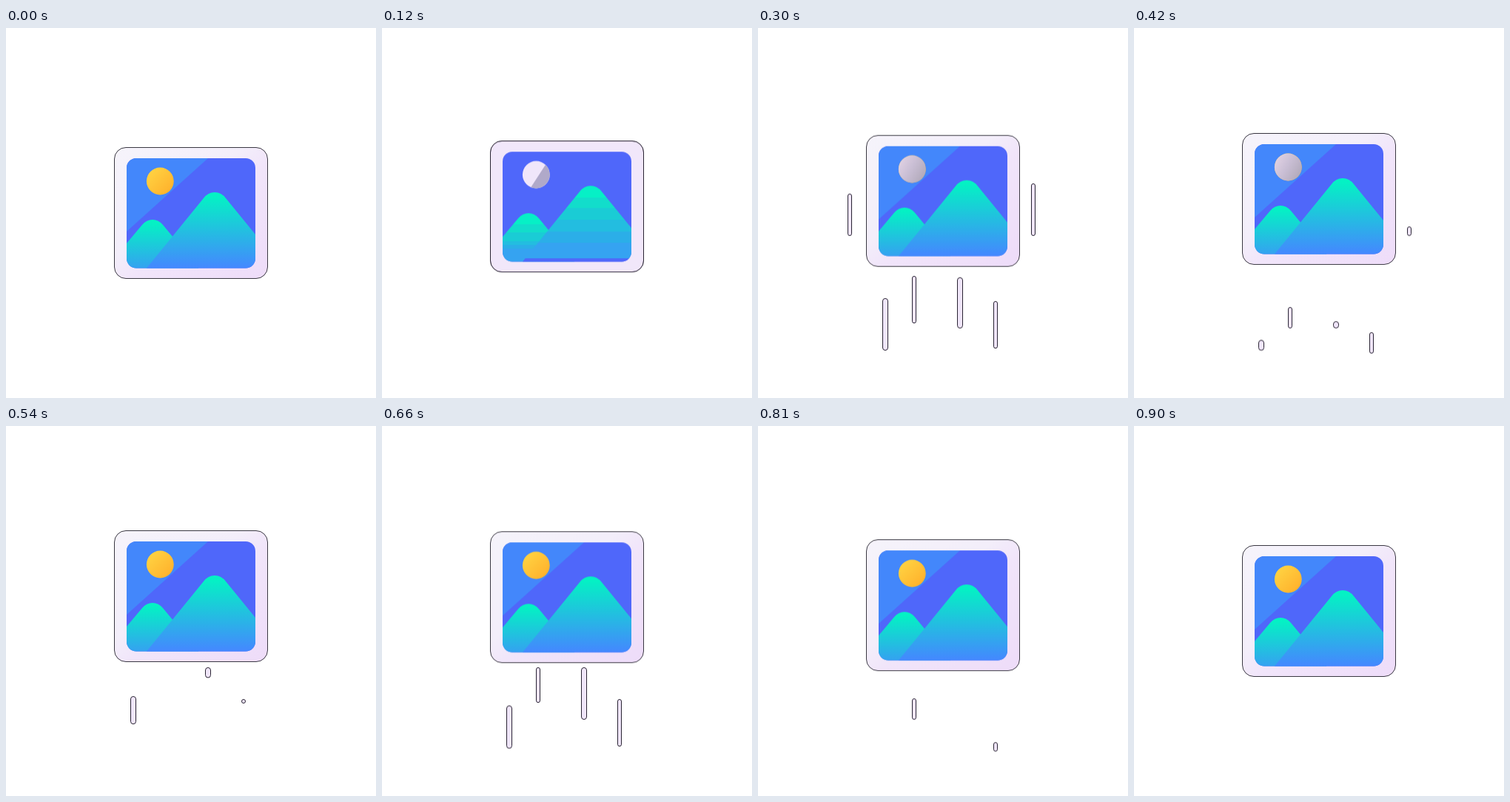
An HTML page for the animation above (0.93 s loop, 500 px wide and 500 px high).

```html
<!DOCTYPE html>
<html lang="en">
<head>
<meta charset="utf-8">
<title>Floating picture</title>
<style>
  html, body { margin: 0; width: 100%; height: 100%; overflow: hidden; background: #fff; }
  svg { display: block; width: 100%; height: 100%; }

  /* The script steps the paused animations through the loop */
  #card, #flat, #grey, .streak { animation: 930ms linear paused both; }

  #card { animation-name: float; }
  @keyframes float {
    0% { transform: none; animation-timing-function: cubic-bezier(.18, .5, .6, 1); }
    58.06%, 61.29% { transform: translateY(-20px); animation-timing-function: cubic-bezier(.55, 0, .67, .66); }
    96.77%, 100% { transform: none; }
  }

  #flat { animation-name: flat; animation-timing-function: step-end; }
  @keyframes flat {
    0%, 22.5%, 100% { visibility: hidden; }
    3.2% { visibility: visible; }
  }

  #grey { animation-name: grey; animation-timing-function: step-end; }
  @keyframes grey {
    0%, 58%, 100% { visibility: hidden; }
    3.2% { visibility: visible; }
  }

  .streak {
    visibility: hidden;
    fill: #f0e6fa;
    stroke: #2a2433;
    animation: trim 300ms cubic-bezier(.333, 0, .667, 1) paused;
  }
  @keyframes trim {
    0% { visibility: visible; height: var(--w); transform: translateY(0); }
    50% { visibility: visible; height: 70px; transform: translateY(0); }
    100% { visibility: visible; height: var(--w); transform: translateY(calc(70px - var(--w))); }
  }
</style>
</head>
<body>
<svg viewBox="0 0 500 500">
  <defs>
    <linearGradient id="frameFill" x1="0" y1="0" x2="1" y2="1">
      <stop stop-color="#f6f4fb"/><stop offset=".42" stop-color="#f3eefa"/>
      <stop offset=".55" stop-color="#f1e5fa"/><stop offset="1" stop-color="#eedcf9"/>
    </linearGradient>
    <linearGradient id="hill" gradientUnits="userSpaceOnUse" x1="0" y1="222" x2="0" y2="324">
      <stop offset=".05" stop-color="#04f2c4"/><stop offset="1" stop-color="#4488ff"/>
    </linearGradient>
    <linearGradient id="knoll" gradientUnits="userSpaceOnUse" x1="0" y1="259" x2="0" y2="344">
      <stop offset=".05" stop-color="#04f2c4"/><stop offset="1" stop-color="#4488ff"/>
    </linearGradient>
    <linearGradient id="hillBands" gradientUnits="userSpaceOnUse" x1="0" y1="222" x2="0" y2="324"></linearGradient>
    <linearGradient id="knollBands" gradientUnits="userSpaceOnUse" x1="0" y1="259" x2="0" y2="324"></linearGradient>
    <linearGradient id="gold" x1="0" y1="0" x2="1" y2="1">
      <stop offset=".15" stop-color="#ffd141"/><stop offset=".85" stop-color="#ffb32d"/>
    </linearGradient>
    <linearGradient id="silver" x1="0" y1=".2" x2="1" y2=".8">
      <stop stop-color="#e2d2e4"/><stop offset=".45" stop-color="#cabfd5"/>
      <stop offset="1" stop-color="#b0a8b8"/>
    </linearGradient>
    <clipPath id="pane"><rect x="163" y="176" width="174" height="148.5" rx="13"/></clipPath>
    <clipPath id="disc"><circle cx="208.3" cy="207" r="18.4"/></clipPath>
    <rect id="board" x="146.5" y="161.5" width="207" height="177" rx="15.5"/>
    <rect id="sky" x="163" y="176" width="174" height="149" fill="#4f67fa"/>
    <circle id="sun" cx="208.3" cy="207" r="18.4"/>
    <path id="small" d="M163 291 L184 266 Q190 259 198 259 T212 266 L260 324 V326 H163Z"/>
    <path id="big" d="M190 324.5 L267 230 Q273 222 282 222 T297 230 L337 279 V326 H190Z"/>
  </defs>

  <g id="streaks"></g>

  <g id="card">
    <use href="#board" fill="url(#frameFill)" stroke="#3a3842"/>
    <g clip-path="url(#pane)">
      <use href="#sky"/>
      <path d="M163 176 H273 L163 275Z" fill="#4387fb"/>
      <use href="#small" fill="url(#knoll)"/>
      <use href="#big" fill="url(#hill)"/>
    </g>
    <use href="#sun" fill="url(#gold)"/>
    <use id="grey" href="#sun" fill="url(#silver)"/>
    <g id="flat">
      <use href="#board" fill="#f1e7fa" stroke="#2a2433"/>
      <g clip-path="url(#pane)">
        <use href="#sky"/>
        <use href="#small" fill="url(#knollBands)"/>
        <use href="#big" fill="url(#hillBands)"/>
      </g>
      <use href="#sun" fill="#f0e6fa"/>
      <path clip-path="url(#disc)" d="M222 192 L198 229 H230 V188Z" fill="#b0a9c9"/>
    </g>
  </g>
</svg>
<script>
  const LOOP = 930, STEP = 30;
  const SVG = 'http://www.w3.org/2000/svg';

  function add(parent, tag, attrs) {
    const el = document.createElementNS(SVG, tag);
    for (const key in attrs) el.setAttribute(key, attrs[key]);
    return document.getElementById(parent).appendChild(el);
  }

  // Hard-edged gradient: each colour runs to the matching edge
  function bands(id, top, edges, colours) {
    let from = top;
    edges.forEach((to, i) => {
      for (const y of [from, to]) {
        add(id, 'stop', { offset: (y - top) / (324 - top), 'stop-color': colours[i] });
      }
      from = to;
    });
  }

  const tones = ['#06f0c6', '#12ddcb', '#1accd5', '#23bde0', '#2baee8', '#35a3f1'];
  bands('hillBands', 222, [238, 252, 268, 284, 299, 320, 324], [...tones, '#4f67fa']);
  bands('knollBands', 259, [274, 285, 297, 302, 307, 324], tones);

  // x, top, width, start, duration
  const streaks = [
    [121.5, 210.5, 5, 121, 276],
    [369.5, 210.5, 5, 150],
    [168.5, 365.5, 7, 150],
    [208.5, 335.5, 5, 180],
    [269.5, 335.5, 7, 135],
    [318.5, 369.5, 5, 180],
    [168.5, 365.5, 7, 467],
    [208.5, 326.5, 5, 570],
    [269.5, 326.5, 7, 510],
    [318.5, 369.5, 5, 540],
  ];
  for (const [x, y, w, start, span = 300] of streaks) {
    add('streaks', 'rect', {
      class: 'streak', x, y, width: w, rx: w / 2,
      style: `--w:${w}px;animation-delay:${start}ms;animation-duration:${span}ms`,
    });
  }

  const anims = document.getAnimations();
  const begin = performance.now();

  function draw() {
    const t = (performance.now() - begin) % LOOP;
    const held = Math.floor(t / STEP) * STEP;
    for (const a of anims) a.currentTime = held;
    requestAnimationFrame(draw);
  }
  draw();
</script>
</body>
</html>
```
